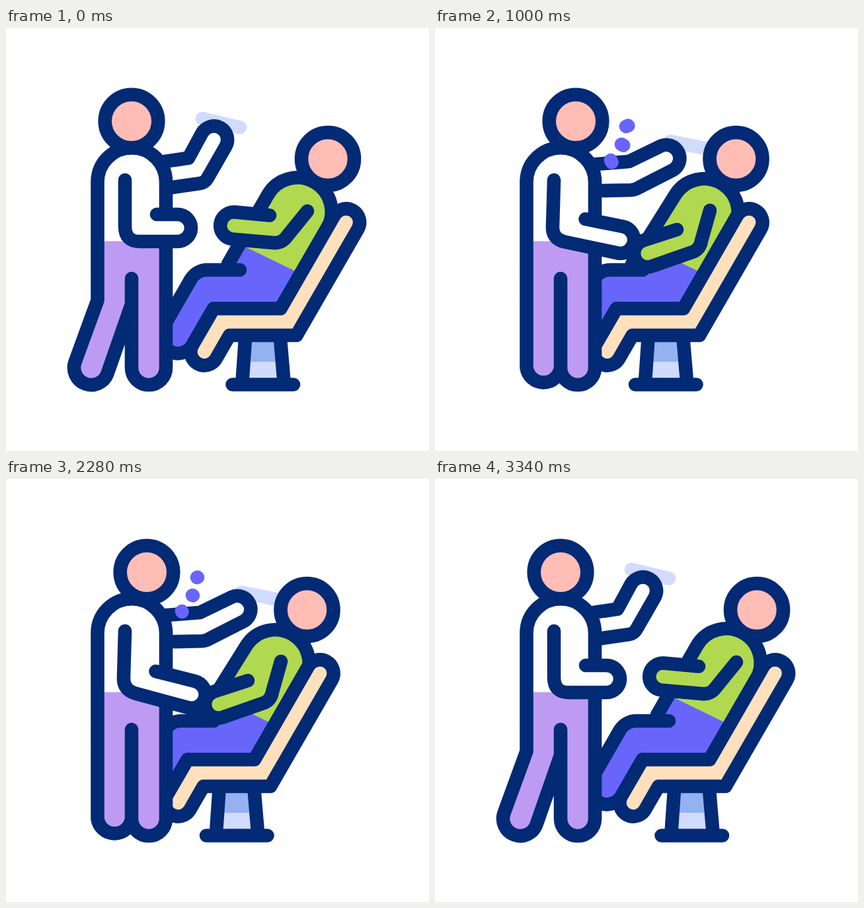
Recreate the animation shown at these times as an HTML page. Size 640 by 640 pixels, loop 3.6 s.

```html
<!DOCTYPE html>
<html lang="en">
<head>
<meta charset="utf-8">
<title>Barber chair</title>
<style>
  html, body { margin: 0; width: 100%; height: 100%; overflow: hidden; background: #fff; }
  svg { display: block; width: 100vw; height: 100vh; }
  .line { stroke: #022a75; stroke-width: 20.6; stroke-linecap: round; stroke-linejoin: round; }
</style>
</head>
<body>
<svg id="stage" viewBox="0 0 640 640" fill="none">
  <path id="comb" stroke="#d1dbff" stroke-width="20.6" stroke-linecap="round"/>
  <g id="seat">
    <path fill="#94b1f2" d="M362 470H415L418 505H359.5Z"/>
    <path fill="#d1dbff" d="M359.5 505H418L420.5 535H357.5Z"/>
    <path class="line" d="M362 470L357.5 535M415 470L420.5 535M342.5 539.5H435"/>
  </g>
  <path id="shirt" fill="#b1d94f"/>
  <g id="legs">
    <path fill="#6866fa" d="M353.7 327L446 372L415.4 424.5H314.1L282 480A26 26 0 0 1 237 454L279.3 380.7A29 29 0 0 1 305 366H336Z"/>
    <path class="line" d="M354 366H305A29 29 0 0 0 279.3 380.7L237 454A26 26 0 0 0 282 480L314.1 424.5"/>
  </g>
  <path id="trunk" class="line"/>
  <g id="chair">
    <path class="line" fill="#ffe0bd" d="M439.5 465L532.3 304.3A20.5 20.5 0 0 0 496.7 283.7L415.4 424.5H314.1L282.2 479.7A20.5 20.5 0 0 0 317.8 500.3L338.2 465Z"/>
  </g>
  <path id="restArm" class="line" fill="#b1d94f"/>
  <circle id="guest" class="line" fill="#ffbdb6" cy="198" r="40"/>
  <path id="combArm" class="line" fill="#fff"/>
  <path id="trousers" fill="#bd9bf2"/>
  <path fill="#fff" d="M138.5 322.5V233A51.75 51.75 0 0 1 242 233V322.5Z"/>
  <path id="coat" class="line"/>
  <path id="cutArm" class="line" fill="#fff"/>
  <circle id="barber" class="line" fill="#ffbdb6" cy="141" r="40.3"/>
  <path id="ticks" stroke="#6866fa" stroke-width="20.6" stroke-linecap="round"/>
</svg>
<script>
const LOOP = 3600, LEAN_IN = 425, LEAN_OUT = 2895, UPRIGHT = 3333;
const SWAY = { start: 433, period: 345, combTurns: 7, cutTurns: 3 };
const TICK = { start: 528, period: 433.3, count: 5, reach: 40 };

// Each part: standing apart, leaning together, and reaching while at work.
const poses = {
  comb: [
    "M297 137L354 150.5",
    "M348.4 170.3L403 190.4",
    "M356 171.5L412 182.5"],
  combArm: [
    "M240 202L276 196.8L296.7 158.7A20.5 20.5 0 0 1 332.3 179.3L305 227Q301 234 294 235L242 242.5",
    "M240 206.3L293.5 201L332 176A20.5 20.5 0 0 1 354 211L309 241Q303 245 296 245.3L242 246.3",
    "M240 206.3L293.5 202L341.9 178.4A20.5 20.5 0 0 1 361 214.5L309 241Q303 245 296 245.3L242 246.3"],
  cutArm: [
    "M180 230L180 300Q180 323 202 323L259.5 323A20.5 20.5 0 0 0 259.5 282L228 282",
    "M180 230L178 300Q177 319 196 324.5L276 346A20.5 20.5 0 0 0 286 306L226.5 291",
    "M180 230L178 300Q177 319 196 323.5L277 340.6A20.5 20.5 0 0 0 285 300.4L227.5 289"],
  coat: [
    "M190 379L190 514A26 26 0 0 0 242 514L242 233A51.75 51.75 0 0 0 138.5 233L138.5 412L104.6 505A26 26 0 0 0 153.4 523L190 418",
    "M190 379L190 514A26 26 0 0 0 242 514L242 233A51.75 51.75 0 0 0 138.5 233L138.5 412L138.5 514A26 26 0 0 0 190 514L190 418"],
  trunk: [
    "M336 357L396.3 252.2A51.5 51.5 0 0 1 485.7 303.8L415.4 424.5",
    "M298 357L363.7 252A51.5 51.5 0 0 1 450.7 307.3L375.9 424.5"],
  restArm: [
    "M456 277L422 319Q415 326 405 325L342 319.4A20.5 20.5 0 0 1 345.7 278.6L399 283.5",
    "M416 276L403 322Q401 334 391 338.5L328 360.5A20.5 20.5 0 0 1 315 321.5L366 305"]
};
const ticks = [[289, 149, -22], [282, 176, 27], [266, 200, 65]];

const $ = id => document.getElementById(id);
const set = (id, name, value) => $(id).setAttribute(name, value);
const lerp = (a, b, k) => a + (b - a) * k;
const ease = x => {
  x = Math.min(1, Math.max(0, x));
  return x * x * (3 - 2 * x);
};

function mix(a, b, k) {
  const num = /-?[\d.]+/g, goal = b.match(num);
  let i = 0;
  return a.replace(num, n => +lerp(+n, +goal[i++], k).toFixed(2));
}

function sway(t, turns) {
  const n = (t - SWAY.start) / SWAY.period;
  return n > 0 && n < turns ? (1 - Math.cos(2 * Math.PI * n)) / 1.62 : 0;
}

function tickPath(t) {
  const n = (t - TICK.start) / TICK.period;
  if (n <= 0 || n >= TICK.count) return "";
  const phase = n % 1 * 2;
  const head = TICK.reach * ease(phase) + 0.01;
  const tail = TICK.reach * ease(phase - 1);
  return ticks.map(([x, y, deg]) => {
    const c = Math.cos(deg * Math.PI / 180), s = Math.sin(deg * Math.PI / 180);
    return `M${x + c * tail} ${y + s * tail}L${x + c * head} ${y + s * head}`;
  }).join("");
}

function draw(t) {
  const lean = ease(t / LEAN_IN) - ease((t - LEAN_OUT) / (UPRIGHT - LEAN_OUT));
  const combing = sway(t, SWAY.combTurns);
  const work = { comb: combing, combArm: combing, cutArm: sway(t, SWAY.cutTurns) };

  for (const id in poses) {
    const [apart, close, reach] = poses[id];
    let d = mix(apart, close, lean);
    if (reach && work[id]) d = mix(d, reach, work[id]);
    set(id, "d", d);
  }
  set("trousers", "d", $("coat").getAttribute("d"));
  set("shirt", "d", $("trunk").getAttribute("d"));

  for (const id of ["seat", "legs", "chair"]) set(id, "transform", `translate(${-39.5 * lean} 0)`);
  set("barber", "cx", lerp(190, 213, lean));
  set("guest", "cx", lerp(487, 455.5, lean));
  set("ticks", "d", tickPath(t));
}

function frame() {
  draw(performance.now() % LOOP);
  requestAnimationFrame(frame);
}
frame();
</script>
</body>
</html>
```
